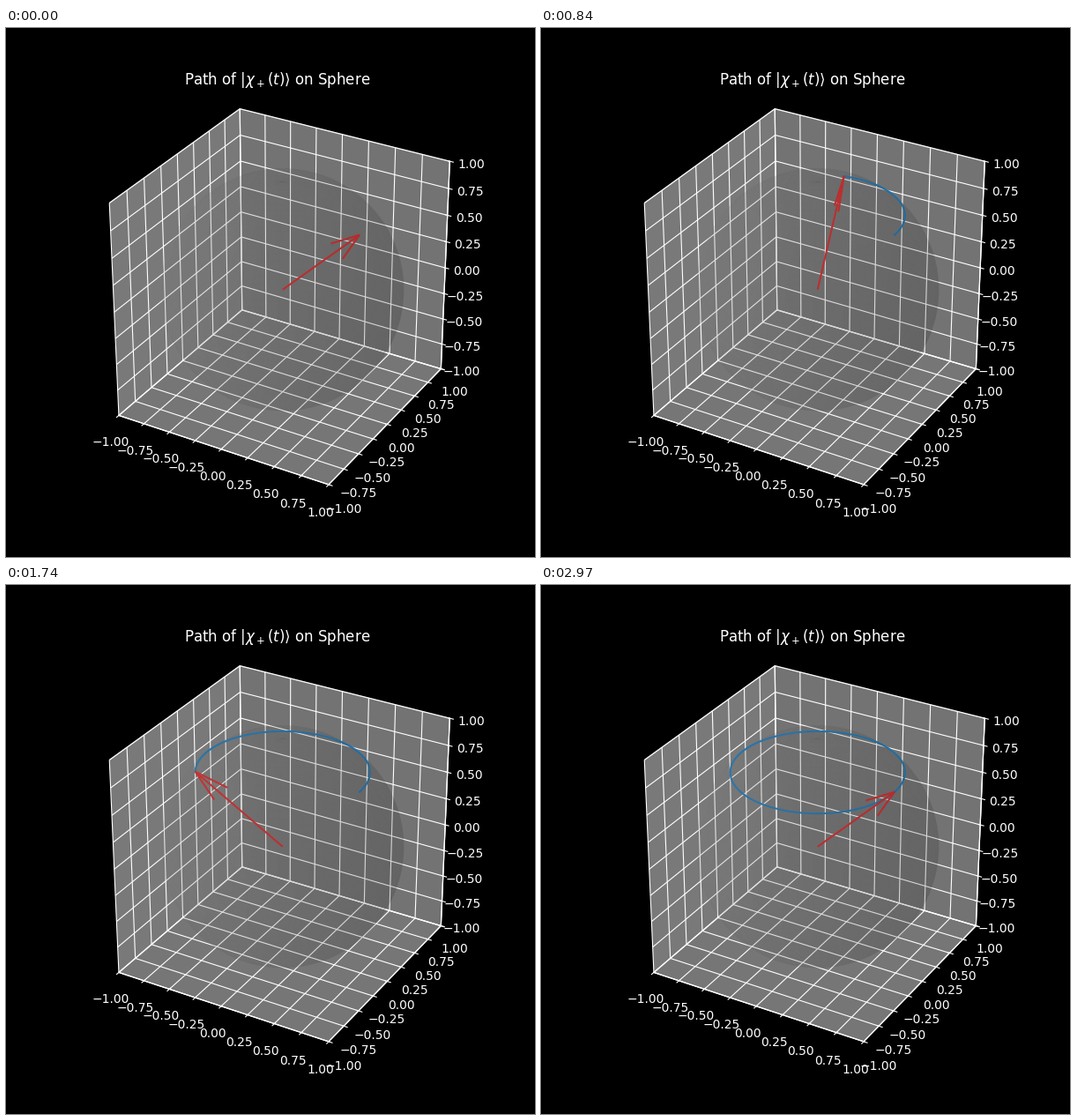
A matplotlib script for the animation above (3 s loop, 600 by 600 pixels).

```python
import numpy as np
import matplotlib.pyplot as plt
from matplotlib.animation import ArtistAnimation

FRAMES = 100
INTERVAL = 30

plt.style.use("dark_background")
fig = plt.figure(figsize=(6, 6), dpi=100)
ax = fig.add_subplot(projection="3d")
ax.set_title(r"Path of $|\chi_+(t)\rangle$ on Sphere")

# Faint unit sphere
u = np.linspace(0, 2 * np.pi, 100)
v = np.linspace(0, np.pi, 100)
ax.plot_surface(
    np.outer(np.cos(u), np.sin(v)),
    np.outer(np.sin(u), np.sin(v)),
    np.outer(np.ones_like(u), np.cos(v)),
    color="gray",
    alpha=0.1,
)

# Spin vector precessing about z at a fixed polar angle
theta = np.pi / 4
phi = np.linspace(0, 2 * np.pi, FRAMES)
path = np.array([
    np.sin(theta) * np.cos(phi),
    np.sin(theta) * np.sin(phi),
    np.full(FRAMES, np.cos(theta)),
])


def pose(i):
    trail = ax.plot(*path[:, : i + 1], color="tab:blue")[0]
    arrow = ax.quiver(0, 0, 0, *path[:, i], color="tab:red")
    return trail, arrow


poses = [pose(i) for i in range(FRAMES)]

ax.set(xlim=(-1, 1), ylim=(-1, 1), zlim=(-1, 1))
ax.set_box_aspect((1, 1, 1))

anim = ArtistAnimation(fig, poses, interval=INTERVAL, repeat=True, repeat_delay=0)

plt.show()
```
